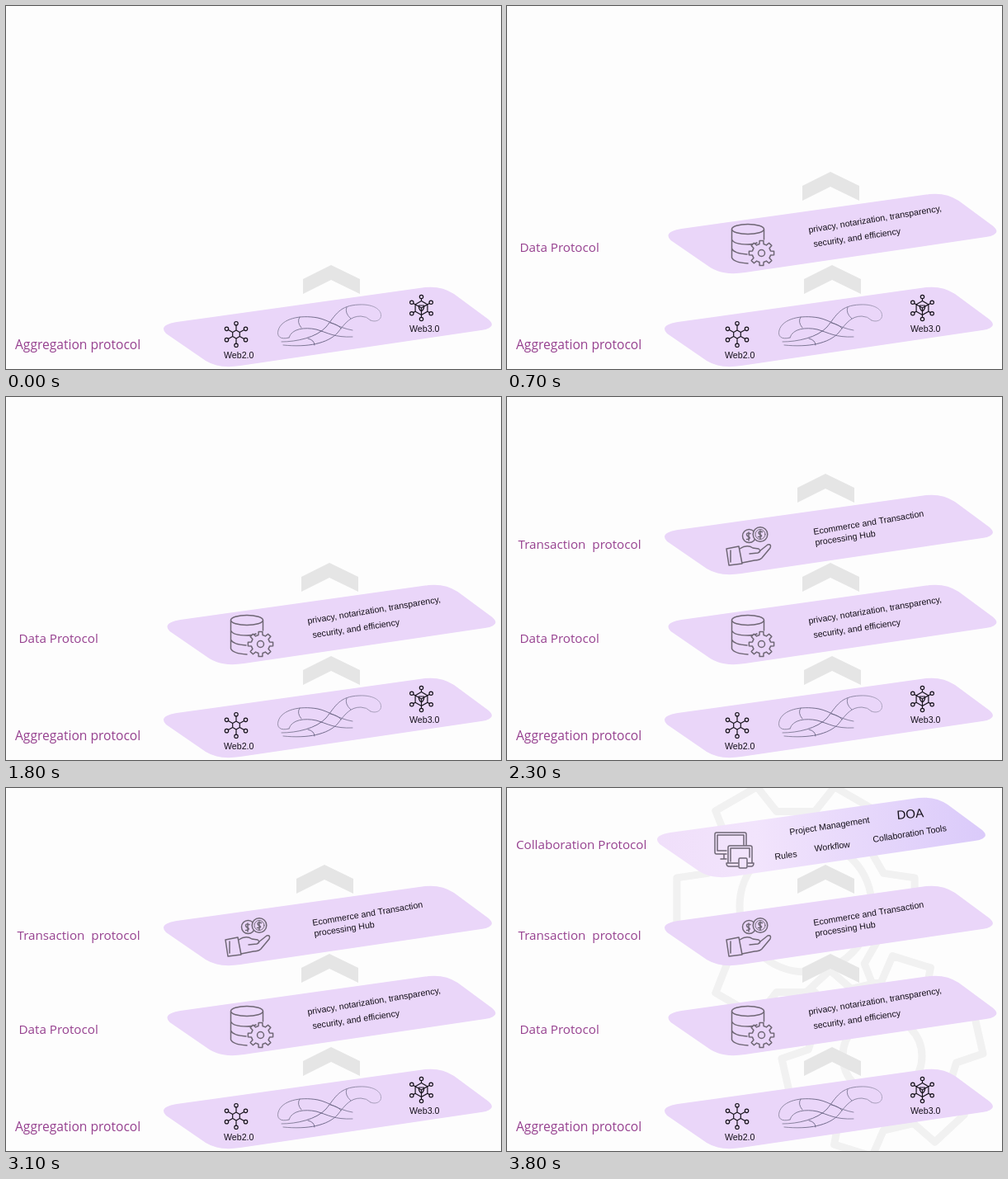
Animation of 600 by 440 pixels, one loop 4.1 s. Source, as an HTML page:

```html
<!DOCTYPE html>
<html lang="en">
<head>
<meta charset="utf-8">
<title>Protocol stack</title>
<style>
  html, body { margin: 0; width: 100%; height: 100%; overflow: hidden; background: #fdfdfd; }
  svg { display: block; width: 600px; height: 440px; }
  .label { font: 15.2px "Open Sans", "Noto Sans", sans-serif; fill: #96408f; white-space: pre; }
  .note { font: 10.65px "Liberation Sans", Arial, sans-serif; fill: #15101a; }
  .line { fill: none; stroke-linecap: round; stroke-linejoin: round; }
  .icon { stroke: #6f6775; stroke-width: 1.5; }
  .net { stroke: #17131b; stroke-width: 1.2; }
  .filled { fill: #ead6f9; }
</style>
</head>
<body>
<svg viewBox="0 0 600 440">
  <defs>
    <path id="plate" d="M207 383L508 341Q528 339 543 349L585 380Q596 390 576 393L284 436Q258 440 242 430L194 397Q184 387 207 383Z"/>
    <path id="chevron" d="M360 331L394 314L429 331V349L394 332L360 349Z" fill="#e5e5e5"/>
    <linearGradient id="topFill">
      <stop offset="0" stop-color="#f0dffa"/>
      <stop offset=".3" stop-color="#f2e4fc"/>
      <stop offset="1" stop-color="#dacafa"/>
    </linearGradient>
    <linearGradient id="ribbon" gradientUnits="userSpaceOnUse" x1="330" y1="0" x2="455" y2="0">
      <stop offset="0" stop-color="#8d87a0"/>
      <stop offset=".4" stop-color="#5f5a7a"/>
      <stop offset="1" stop-color="#a8a0bb"/>
    </linearGradient>
  </defs>

  <g id="backdrop" data-at="3400" class="line" stroke="#f1f1f1" stroke-width="9"></g>

  <g data-at="0">
    <use href="#chevron"/>
    <use href="#plate" fill="#ead6f9"/>
    <text class="label" x="11" y="416" style="font-size:15.6px">Aggregation protocol</text>
    <g id="networks" class="line net"></g>
    <text class="note" x="264" y="427">Web2.0</text>
    <text class="note" x="489" y="395">Web3.0</text>
    <g class="line" stroke="url(#ribbon)" stroke-width=".9">
      <path d="M343 402C332 405 328 400 330 393C334 379 356 374 378 378C392 381 402 390 420 393"/>
      <path d="M343 402C346 391 362 389 376 392C390 396 398 402 420 401"/>
      <path d="M334 407C352 407 376 402 388 389C400 374 404 363 428 362C448 361 457 370 454 378C452 382 446 383 442 381"/>
      <path d="M336 411C366 414 390 409 402 396C412 383 418 376 430 376Q437 376 442 381"/>
      <path d="M356 377Q352 383 358 390M366 403Q374 405 374 411M393 384Q403 386 406 391M413 365Q410 372 418 379"/>
    </g>
  </g>

  <g data-at="700">
    <use href="#chevron" x="-2" y="-113"/>
    <use href="#plate" x="4.5" y="-113" fill="#ead6f9"/>
    <text class="label" x="15.5" y="298">Data Protocol</text>
    <g class="line icon">
      <ellipse cx="292" cy="270.500" rx="19.500" ry="6"/>
      <path d="M272.500 271V305Q275 311 292 312M311.500 271V283M272.500 283Q275 289 292 289Q299 289 303 287M272.500 294Q275 300 291 301"/>
      <path id="cog" class="filled"/>
      <circle cx="308.500" cy="299.500" r="4"/>
    </g>
    <text class="note" transform="translate(366 275) rotate(-9.3)">privacy, notarization, transparency,</text>
    <text class="note" transform="translate(372 292) rotate(-8.5)">security, and efficiency</text>
  </g>

  <g data-at="2300">
    <use href="#chevron" x="-8" y="-221"/>
    <use href="#plate" y="-222" fill="#ead6f9"/>
    <text class="label" x="13.5" y="184">Transaction  protocol</text>
    <g class="line icon">
      <circle cx="293.500" cy="168.500" r="8"/>
      <circle class="filled" cx="307" cy="166.500" r="8.800"/>
      <circle cx="307" cy="166.500" r="6" stroke-width="1"/>
      <path d="M295 165.500Q290 164 290.500 167Q291 169 293.500 169.500Q296 172 290.500 172.500M293 164V174M309.500 163.500Q304.500 162 305 165Q305.500 166.500 307.500 167Q310.500 169.500 304.500 169.500M307 162V172"/>
      <path d="M266 184L281 181L285 202L269 204ZM271 186V200"/>
      <path d="M282 184Q291 178 298 183L305 184Q309 187 304 189L294 190M306 187L316 179Q321 178 319 183L309 195Q306 198 300 198L285 201"/>
    </g>
    <text class="note" transform="translate(372 167) rotate(-9.5)">Ecommerce and Transaction</text>
    <text class="note" transform="translate(374 180) rotate(-8.7)">processing Hub</text>
  </g>

  <g data-at="3400">
    <use href="#plate" x="-9" y="-329" fill="url(#topFill)"/>
    <text class="label" x="11" y="74">Collaboration Protocol</text>
    <g class="line icon">
      <path d="M266 80H254Q252 80 252 78V56Q252 54 254 54H288Q290 54 290 56V69M255 76H266M255 76V57H287V69M263 80V86H259H266"/>
      <path d="M268 90V72Q268 70 270 70H295Q297 70 297 72V90M271 89V73H294V84M280 91H266Q266 95 269 95H280M292 95H296Q299 95 299 91H292"/>
      <rect x="281" y="85" width="10" height="12" rx="1.500"/>
    </g>
    <text class="note" transform="translate(343 57) rotate(-8.8)">Project Management</text>
    <text class="note" transform="translate(473 38) rotate(-5)" style="font-size:15px">DOA</text>
    <text class="note" transform="translate(325 87) rotate(-8)">Rules</text>
    <text class="note" transform="translate(373 77) rotate(-7)">Workflow</text>
    <text class="note" transform="translate(444 66) rotate(-9)">Collaboration Tools</text>
  </g>
</svg>
<script>
const LOOP = 4100;
const byId = id => document.getElementById(id);
const polar = (x, y, r, a) => [x + r * Math.sin(a), y - r * Math.cos(a)];
const path = points => "M" + points.map(p => p.map(n => n.toFixed(1)).join(" ")).join("L");
const hexagon = (x, y, r) => Array.from({ length: 6 }, (_, i) => polar(x, y, r, i * Math.PI / 3));

function gear(x, y, inner, outer, teeth, turn = 0) {
  const points = [];
  for (let i = 0; i < teeth; i++) {
    for (const [r, shift] of [[inner, -.3], [outer, -.19], [outer, .19], [inner, .3]])
      points.push(polar(x, y, r, turn + (i + shift) * 2 * Math.PI / teeth));
  }
  return path(points) + "Z";
}

function network(x, y, core, reach, cube) {
  const inner = hexagon(x, y, core);
  const nodes = hexagon(x, y, reach);
  const spokes = nodes.map((node, i) => path([inner[i], polar(x, y, reach - 2.2, i * Math.PI / 3)]));
  const edges = cube ? [1, 3, 5].map(i => path([[x, y], inner[i]])) : [];
  const dots = nodes.map(([cx, cy]) => `<circle cx="${cx}" cy="${cy}" r="2.2"/>`);
  const shield = cube ? `<path d="M${x - 3} ${y - 3}h6v3q-1 3 -3 4q-2 -1 -3 -4Z"/>` : "";
  return `<path d="${path(inner)}Z${spokes.join("")}${edges.join("")}"/>${dots.join("")}${shield}`;
}

byId("networks").innerHTML =
  network(279, 398, 5, 13.3, false) + network(503.5, 366, 8.5, 13.5, true);
byId("cog").setAttribute("d", gear(308.5, 299.5, 11.3, 15.3, 8));
byId("backdrop").innerHTML = `
  <path d="${gear(350, 138, 112, 147, 6, Math.PI / 2)}"/>
  <circle cx="362" cy="143" r="80"/>
  <path d="${gear(455, 325, 90, 122, 6, .3)}"/>
  <circle cx="455" cy="325" r="48"/>`;

const layers = [...document.querySelectorAll("[data-at]")];
function draw(now) {
  const time = now % LOOP;
  for (const layer of layers)
    layer.style.visibility = time >= +layer.dataset.at ? "visible" : "hidden";
}
function tick() {
  draw(performance.now());
  requestAnimationFrame(tick);
}
tick();
</script>
</body>
</html>
```
